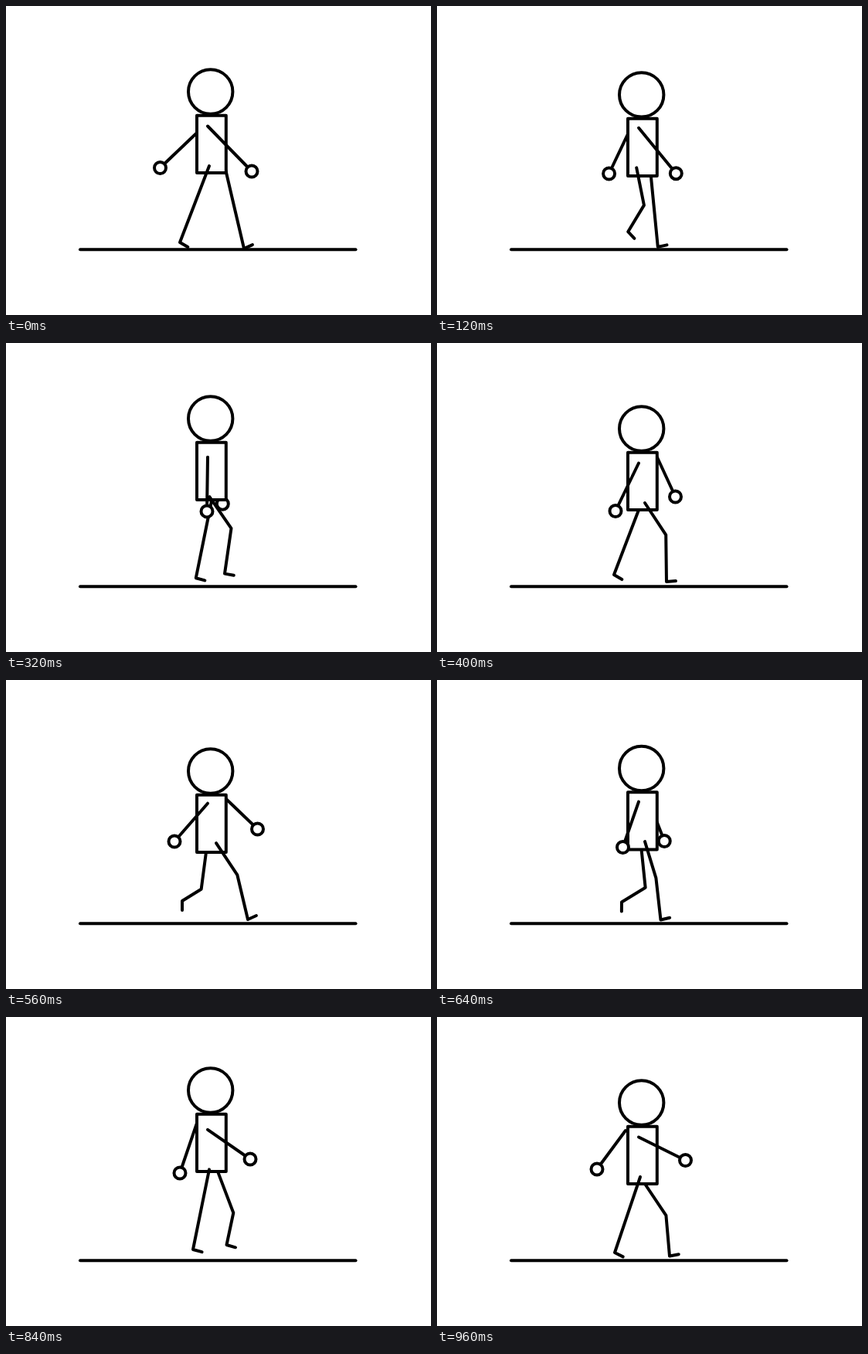
These frames come from a looping animation (550 by 400 pixels, 1 s). An HTML page with a canvas:

```html
<!DOCTYPE html>
<html lang="en">
<head>
<meta charset="utf-8">
<title>Walk cycle</title>
<style>
  html, body { margin: 0; height: 100%; overflow: hidden; background: #fff; }
  canvas { display: block; }
</style>
</head>
<body>
<canvas id="stage" width="550" height="400"></canvas>
<script>
const LOOP = 1000, STEP = 40, RAD = Math.PI / 180;
const ctx = document.getElementById('stage').getContext('2d');

// Key poses: contact, passing, contact, down, passing, up, contact
const times = [0, 200, 400, 560, 720, 840, 960];

// Vertical body offset, with an extra rise before the second contact
const liftTimes = [0, 200, 320, 400, 560, 720, 840, 960];
const lifts = [[0], [6.5], [-13], [0], [7], [0], [-16], [0]];

// Arms: hand x, hand y, shoulder x (if it moves)
const nearArm = [
  [318, 214], [303.5, 218.5], [231, 217.5], [218, 209],
  [263, 224], [316, 184], [321.5, 185.5]
];
const farArm = [
  [199.5, 209.5, 265], [238, 222, 248], [308.5, 199, 284.5], [325.5, 193, 282],
  [263, 224, 260], [225, 202, 247], [207, 197, 244]
];

// Legs: heel x, heel y, hip x, knee bend in degrees
const nearLeg = [
  [225, 306, 263, 0], [262, 283, 255, 31.5], [297, 309, 269, 18], [313, 310, 272, 11],
  [266, 311, 266, 0], [242, 301, 263, 0], [230, 305, 263, 0]
];
const farLeg = [
  [308, 314, 283, 0], [271, 310.5, 271, 0], [229, 300, 264.5, 0], [228, 286, 260.5, 16],
  [250, 289, 266.5, 30.5], [285.5, 295, 273, 13.5], [301, 309.5, 263, 13.5]
];

function tween(keys, rows, t) {
  let i = 0;
  while (i < keys.length - 2 && t >= keys[i + 1]) i++;
  const k = (t - keys[i]) / (keys[i + 1] - keys[i]);
  return rows[i].map((v, j) => v + (rows[i + 1][j] - v) * k);
}

function path(...points) {
  ctx.beginPath();
  for (const [x, y] of points) ctx.lineTo(x, y);
  ctx.stroke();
}

function circle(x, y, r) {
  ctx.beginPath();
  ctx.arc(x, y, r, 0, Math.PI * 2);
  ctx.fill();
  ctx.stroke();
}

const polar = ([x, y], len, angle) => [x + len * Math.cos(angle), y + len * Math.sin(angle)];
const angleTo = (a, b) => Math.atan2(b[1] - a[1], b[0] - a[0]);

function arm(rows, t, shoulderY) {
  const [x, y, shoulderX = 261] = tween(times, rows, t);
  path([shoulderX, shoulderY], [x, y]);
  circle(x, y, 7.5);
}

// The foot tips further than the shin that carries it
function leg(rows, t, hipY, thigh) {
  const [x, y, hipX, bend] = tween(times, rows, t);
  const hip = [hipX, hipY], heel = [x, y];
  const knee = polar(hip, thigh, angleTo(hip, heel) - bend * RAD);
  const tip = 1.6 * (angleTo(knee, heel) - 92 * RAD);
  path(hip, knee, heel, polar(heel, 12, tip));
}

function draw(t) {
  const [lift] = tween(liftTimes, lifts, t);
  const sway = lift * 0.6; // joints follow the body only in part
  ctx.fillStyle = '#fff';
  ctx.fillRect(0, 0, 550, 400);
  ctx.strokeStyle = '#000';
  ctx.lineWidth = 4;
  ctx.lineCap = ctx.lineJoin = 'round';

  path([96, 315.3], [452.5, 315.3]);
  arm(farArm, t, 147 + sway);
  leg(farLeg, t, 207 + sway, 60);

  circle(264.7, 111 + lift, 28.7);
  ctx.beginPath();
  ctx.rect(247, 141.8 + lift, 37.8, 74.2);
  ctx.fill();
  ctx.stroke();

  arm(nearArm, t, 155.5 + sway);
  leg(nearLeg, t, 207 + sway, 49.5);
}

function tick() {
  draw(Math.floor(performance.now() % LOOP / STEP) * STEP);
  requestAnimationFrame(tick);
}
tick();
</script>
</body>
</html>
```
